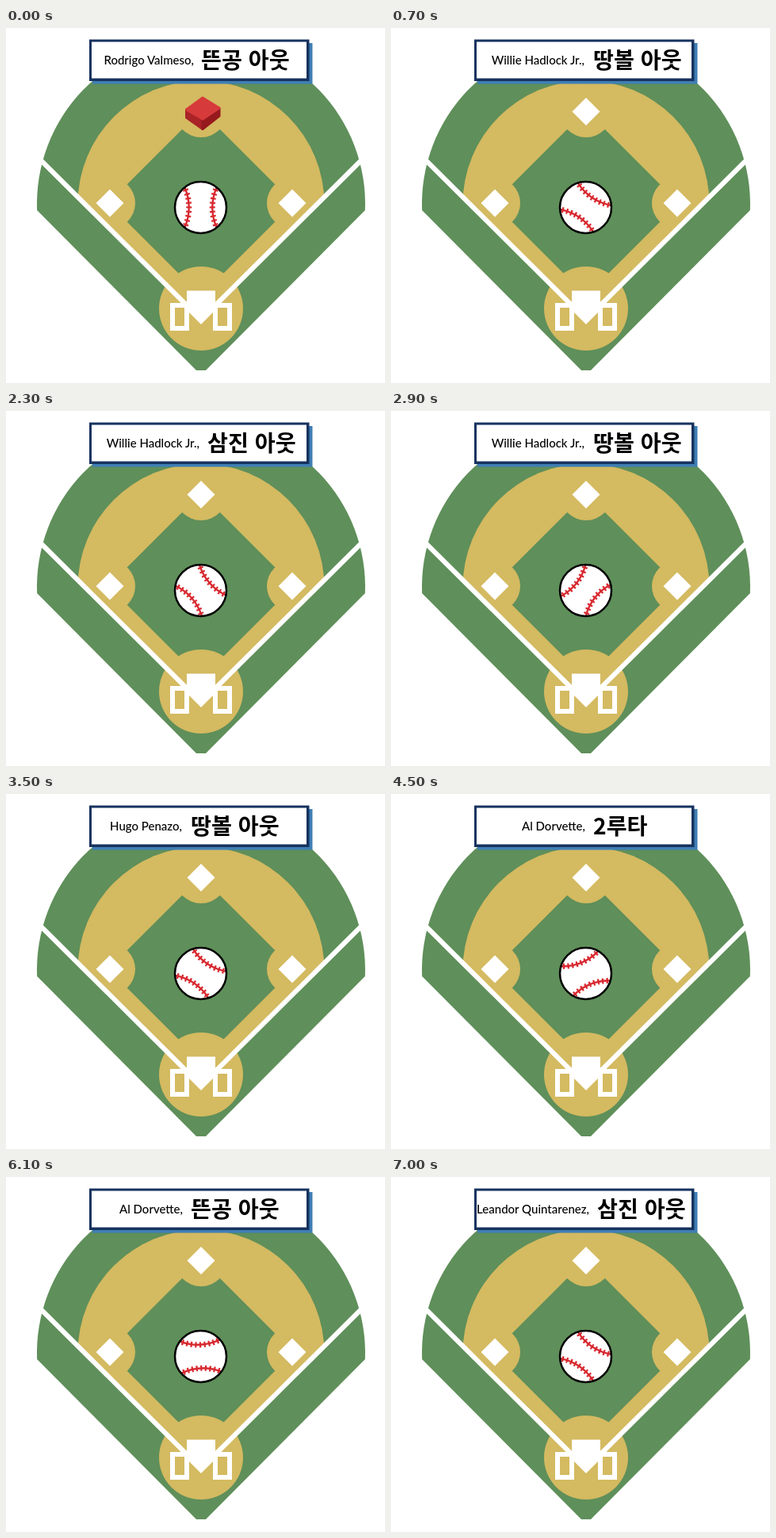
An HTML page that plays this animation: 478x448 px, repeating every 7.1 s.

```html
<!DOCTYPE html>
<html lang="ko">
<head>
<meta charset="utf-8">
<title>Baseball</title>
<style>
  html, body { margin: 0; width: 100%; height: 100%; overflow: hidden; background: #fff; }
  svg { display: block; }
  #name { font: 500 15px Lato, "Open Sans", sans-serif; text-anchor: end; }
  #play { font: 700 28.2px "Noto Sans CJK KR", "Noto Sans CJK", "Noto Sans CJK JP", sans-serif; }
  .dirt { fill: #d4ba61; }
  .grass { fill: #5f8f5a; }
  .line { fill: none; stroke: #fff; stroke-width: 6; }
</style>
</head>
<body>
<svg width="478" height="448" viewBox="0 0 478 448">
  <defs>
    <clipPath id="fair"><path d="M42 165L246 368L450 165V0H42Z"/></clipPath>
    <path id="base" d="M0-17.5L17.5 0L0 17.5L-17.5 0Z" fill="#fff"/>
    <path id="curve" d="M-25-20Q0-9.500 25-20" fill="none" stroke="#d8282f"/>
    <g id="seam">
      <use href="#curve" stroke-width="2.400"/>
      <use href="#curve" stroke-width="7" stroke-dasharray="2.200 3.400" stroke-dashoffset="-2"/>
    </g>
  </defs>

  <path class="grass" d="M39.150 230A207 207 0 1 1 452.850 230L252 432H240Z"/>
  <g clip-path="url(#fair)">
    <circle class="dirt" cx="246" cy="222" r="155.500"/>
    <path class="grass" d="M246 104L363 221L246 338L129 221Z"/>
    <g class="dirt">
      <circle cx="131" cy="221" r="32"/>
      <circle cx="361" cy="221" r="32"/>
      <circle cx="246" cy="105" r="33"/>
    </g>
  </g>
  <circle class="dirt" cx="246" cy="354" r="53"/>
  <path class="line" d="M42 165L246 368L450 165"/>
  <path class="line" d="M210 350h18v29h-18zM264 350h18v29h-18z"/>
  <path fill="#fff" d="M228 331.500H264V356L246 374L228 356Z"/>
  <use href="#base" x="131" y="221"/>
  <use href="#base" x="361" y="221"/>
  <use href="#base" x="246" y="105.500" id="second"/>
  <g id="runner" stroke-linejoin="round" stroke-width="3">
    <path d="M227.500 103V113L248 127.500V115Z" fill="#a92327" stroke="#a92327"/>
    <path d="M269 101V111L248 127.500V115Z" fill="#96191e" stroke="#96191e"/>
    <path d="M248 88L269 101L248 115L227.500 103Z" fill="#d63a3a" stroke="#d63a3a"/>
  </g>

  <path fill="#3f7fb5" d="M109 19H386.500V70.500H109Z"/>
  <path fill="#17335f" d="M105 14.500H382.500V67H105Z"/>
  <path fill="#fff" d="M108 17.500H379V63.500H108Z"/>
  <text id="name" y="45.500"></text>
  <text id="play" y="51"></text>

  <g transform="translate(245.500 226.500)">
    <circle r="32.500" fill="#fff"/>
    <g id="seams">
      <use href="#seam"/>
      <use href="#seam" transform="scale(1 -1)"/>
    </g>
    <circle r="32.500" fill="none" stroke="#000" stroke-width="2.500"/>
  </g>
</svg>
<script>
const LOOP = 7100, TICK = 100, SPIN = 350;
const FLY = '뜬공 아웃', GROUND = '땅볼 아웃', STRIKE = '삼진 아웃', DOUBLE = '2루타';
const WILLIE = 'Willie Hadlock Jr.', AL = 'Al Dorvette';

// start time, batter, result, right end of the name, left end of the result
const plays = [
  [0, 'Rodrigo Valmeso', FLY, 237, 246],
  [500, WILLIE, GROUND, 244, 255],
  [1500, WILLIE, STRIKE, 244, 254],
  [2500, WILLIE, GROUND, 244, 255],
  [3500, 'Hugo Penazo', GROUND, 222, 233],
  [4500, AL, DOUBLE, 245, 255],
  [5500, AL, FLY, 223, 233],
  [6500, 'Leandor Quintarenez', STRIKE, 250, 260]
];

const $ = id => document.getElementById(id);
const [name, play, seams, runner, second] =
  ['name', 'play', 'seams', 'runner', 'second'].map($);

function put(el, text, x) {
  el.textContent = text;
  el.setAttribute('x', x);
}

// The ball starts upright, then spins with a slight ease.
function angle(t) {
  if (t === 0) return 90;
  const u = t % SPIN / SPIN;
  return 34 + 360 * u - 11 * Math.sin(Math.PI * u);
}

let shown;
function draw(now) {
  const t = Math.floor(now % LOOP / TICK) * TICK;
  const current = plays.findLast(p => p[0] <= t);
  if (current !== shown) {
    const [start, batter, result, nameEnd, resultX] = shown = current;
    put(name, batter + ',', nameEnd);
    put(play, result, resultX);
    runner.style.display = start ? 'none' : '';
    second.style.display = start ? '' : 'none';
  }
  seams.setAttribute('transform', `rotate(${angle(t)})`);
}

const began = performance.now();
function loop() {
  draw(performance.now() - began);
  requestAnimationFrame(loop);
}
loop();
</script>
</body>
</html>
```
